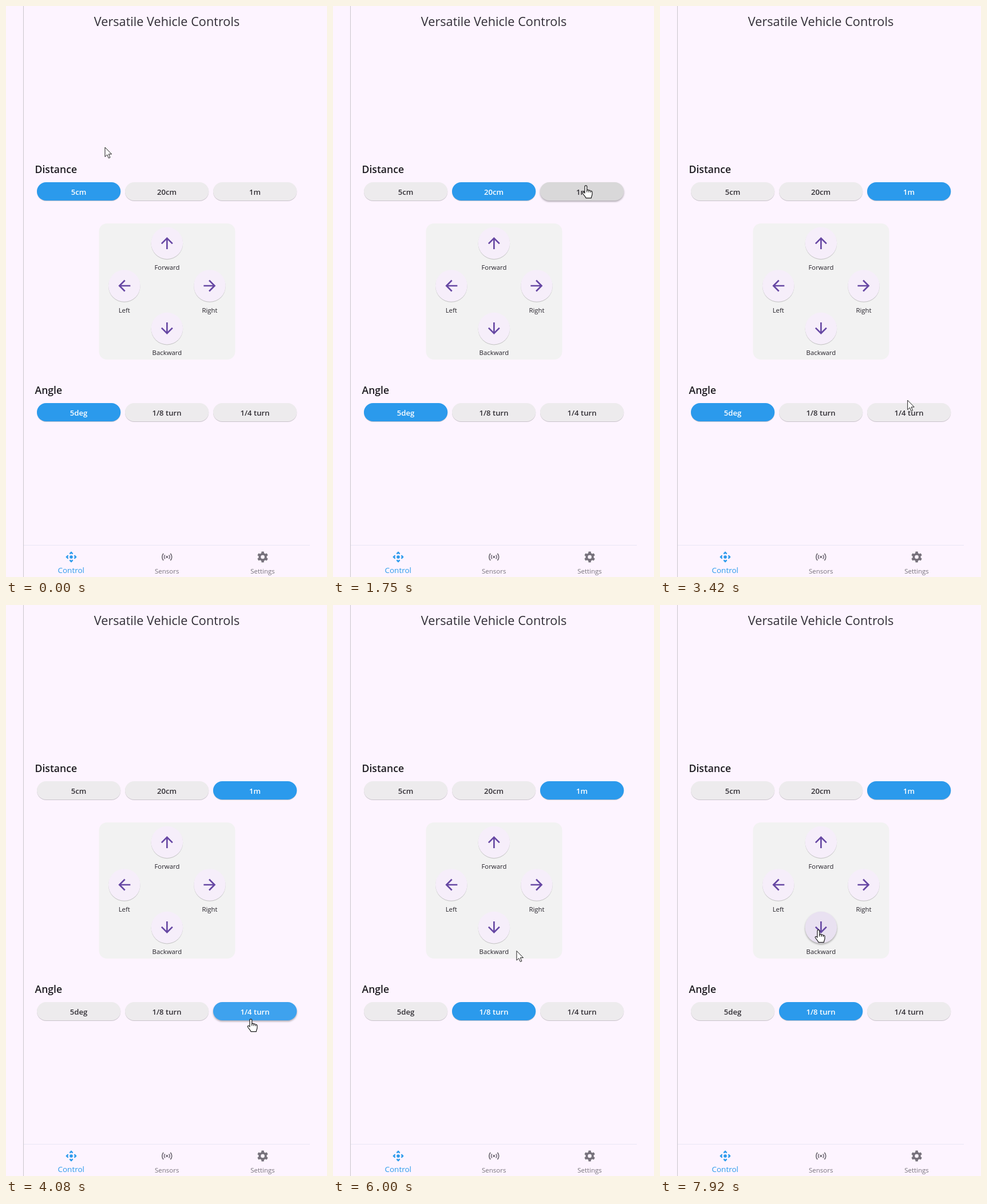
These frames come from a looping animation (561 by 998 pixels, 8 s). An HTML page:

```html
<!DOCTYPE html>
<html lang="en">
<head>
<meta charset="utf-8">
<title>Robot control</title>
<style>
  html, body { margin: 0; width: 100%; height: 100%; overflow: hidden; background: #fdf4ff; }
  svg { display: block; width: 561px; height: 998px; font-family: "Open Sans", "Noto Sans", sans-serif; }
  .mid { text-anchor: middle; }
  .heading { font-size: 17.6px; font-weight: 600; fill: #1d1b20; }
  .pill-label { font-size: 13.2px; font-weight: 600; }
  .caption { font-size: 11.4px; fill: #25222a; }
  .nav { font-size: 11.5px; fill: #77727c; }
</style>
</head>
<body>
<svg viewBox="0 0 561 998">
  <rect width="561" height="998" fill="#fdf4ff"/>
  <path d="M30.5 0V998" stroke="#cbc6cd"/>
  <path d="M31 942.5H531" stroke="#e9e6f5"/>
  <text class="mid" x="281" y="35.3" font-size="21.7" fill="#312e36">Versatile Vehicle Controls</text>
  <rect x="162.5" y="380" width="238" height="238" rx="14" fill="#f2f2f2"/>
  <g id="controls"></g>

  <g id="move" transform="translate(114 963) scale(.97)" fill="#2b9aec"><circle r="2.9"/></g>
  <text class="mid" x="113.7" y="990.5" font-size="13.5" fill="#2b9aec">Control</text>

  <g transform="translate(281.3 963)" fill="none" stroke="#77727c" stroke-width="1.8">
    <circle r="1.9" fill="#77727c" stroke="none"/>
    <path id="waves" d="M3.3-3.3a4.7 4.7 0 0 1 0 6.6M6-6a8.5 8.5 0 0 1 0 12"/>
    <use href="#waves" transform="scale(-1 1)"/>
  </g>
  <text class="mid nav" x="281.2" y="991.5">Sensors</text>

  <g id="gear" transform="translate(448.6 963)" fill="#77727c">
    <circle r="5.2" fill="none" stroke="#77727c" stroke-width="3.8"/>
  </g>
  <text class="mid nav" x="448.5" y="991.5">Settings</text>

  <g id="cursor" fill="#fff" stroke="#1c1c1c" stroke-linejoin="round">
    <path id="arrow" d="M0 0V16.5l3.8-3.6 2.6 6 2.6-1.1-2.6-5.9h5.2z"/>
    <g id="hand" stroke-width="1.2">
      <path d="M-2 13V1.8a1.9 1.9 0 0 1 3.8 0V8.2c.5-1.2 3.2-1 3.4.6 .6-1 3-.7 3.2.9 .8-.8 2.6-.2 2.6 1.5V15c0 2-1.5 3.5-1.7 6.7H0c-.5-2.5-3.5-5-5.6-8.2-.9-1.6 1.2-2.8 2.4-1.6z"/>
      <path d="M1.8 8v3.6M5.2 8.8v3M8.4 9.7v2.4" fill="none"/>
    </g>
  </g>
</svg>
<script>
const LOOP = 8000, HOVER_FADE = 40, SELECT_FADE = 160, HOVER_MARGIN = 2;
const $ = id => document.getElementById(id);

function add(parent, tag, attrs, text = '') {
  const el = document.createElementNS('http://www.w3.org/2000/svg', tag);
  for (const key in attrs) el.setAttribute(key, attrs[key]);
  el.textContent = text;
  return parent.appendChild(el);
}

// Pointer stops: time, x, y
const stops = [
  [0, 173, 247], [830, 340, 324], [1150, 330, 324], [1450, 358, 304], [1660, 425, 303],
  [1750, 442, 314], [2580, 463, 341], [3600, 430, 720], [4080, 428, 724],
  [4700, 330, 720], [5170, 316, 722], [6300, 322, 580], [6920, 280, 471], [7920, 277, 568]
];
const clicks = [1100, 2150, 3700, 4750];

const clamp = v => Math.min(1, Math.max(0, v));
const mix = (a, b, k) => a.map((v, i) => v + (b[i] - v) * k);
const rgb = c => `rgb(${c.map(Math.round)})`;

function pointer(t) {
  const next = stops.findIndex(([at]) => at > t);
  if (next < 1) return stops.at(next).slice(1);
  const [t0, ...a] = stops[next - 1], [t1, ...b] = stops[next];
  const k = (t - t0) / (t1 - t0);
  return mix(a, b, k * k * (3 - 2 * k));
}

function hoverAmount(control, t, samples = 5) {
  let hits = 0;
  for (let k = 0; k < samples; k++) {
    const [x, y] = pointer(Math.max(0, t - k * HOVER_FADE / samples));
    hits += control.inside(x, y, HOVER_MARGIN);
  }
  return hits / samples;
}

const controls = [];

function addRow(title, y, labels) {
  add($('controls'), 'text', { class: 'heading', x: 50.5, y: y - 16 }, title);
  const pills = labels.map((text, i) => {
    const x = 54 + 154 * i;
    const shape = add($('controls'), 'rect', { x, y, width: 146.3, height: 32, rx: 16 });
    const label = add($('controls'), 'text', { class: 'mid pill-label', x: x + 73, y: y + 21.8 }, text);
    const inside = (px, py, margin = 0) =>
      Math.abs(px - x - 73) < 73 + margin && Math.abs(py - y - 16) < 16 + margin;
    return { shape, label, inside };
  });

  // Each click picks the pill under the pointer
  const picks = [[-LOOP, pills[0]]];
  for (const at of clicks) {
    const hit = pills.find(pill => pill.inside(...pointer(at)));
    if (hit) picks.push([at, hit]);
  }
  for (const pill of pills) {
    pill.paint = (hover, t) => {
      const on = picks.reduce((value, [at, pick]) =>
        value + ((pick === pill) - value) * clamp((t - at) / SELECT_FADE), 0);
      const grey = mix([237, 235, 237], [217, 216, 217], hover);
      const blue = mix([43, 154, 236], [62, 162, 238], hover);
      pill.shape.setAttribute('fill', rgb(mix(grey, blue, on)));
      pill.label.setAttribute('fill', rgb(mix([50, 47, 53], [255, 255, 255], on)));
    };
    controls.push(pill);
  }
}

addRow('Distance', 308, ['5cm', '20cm', '1m']);
addRow('Angle', 694, ['5deg', '1/8 turn', '1/4 turn']);

['Forward', 'Right', 'Backward', 'Left'].forEach((name, i) => {
  const turn = i * Math.PI / 2;
  const x = 281.4 + 74.6 * Math.sin(turn), y = 489 - 74.6 * Math.cos(turn);
  const shape = add($('controls'), 'circle', { cx: x, cy: y, r: 27.8 });
  add($('controls'), 'path', {
    d: 'M0 8V-6.2M-7.2 .7L0-6.5 7.2 .7', fill: 'none', stroke: '#6647a3', 'stroke-width': 2,
    transform: `translate(${x} ${y}) rotate(${i * 90}) scale(1.32)`
  });
  add($('controls'), 'text', { class: 'mid caption', x, y: y + 46.8 }, name);
  controls.push({
    shape,
    inside: (px, py, margin = 0) => Math.hypot(px - x, py - y) < 28 + margin,
    paint: hover => shape.setAttribute('fill', rgb(mix([246, 238, 250], [233, 225, 241], hover)))
  });
});

function addSpokes(parent, count, d) {
  for (let i = 0; i < count; i++) add(parent, 'path', { d, transform: `rotate(${360 / count * i})` });
}
addSpokes($('move'), 4, 'M0-10L3.54-6.46 1.77-4.7 0-6.46-1.77-4.7-3.54-6.46z');
addSpokes($('gear'), 6, 'M-2.7-5L-2-9.4H2L2.7-5z');

function draw(t) {
  const [x, y] = pointer(t);
  for (const control of controls) {
    const hover = hoverAmount(control, t);
    control.paint(hover, t);
    control.shape.style.filter =
      `drop-shadow(0 ${1 + hover}px ${.6 + hover * .9}px rgba(0,0,0,${.2 + hover * .1}))`;
  }
  const over = controls.some(control => control.inside(x, y));
  $('hand').style.display = over ? '' : 'none';
  $('arrow').style.display = over ? 'none' : '';
  $('cursor').setAttribute('transform', `translate(${x} ${y})`);
}

const start = performance.now();
function tick() {
  draw((performance.now() - start) % LOOP);
  requestAnimationFrame(tick);
}
tick();
</script>
</body>
</html>
```
